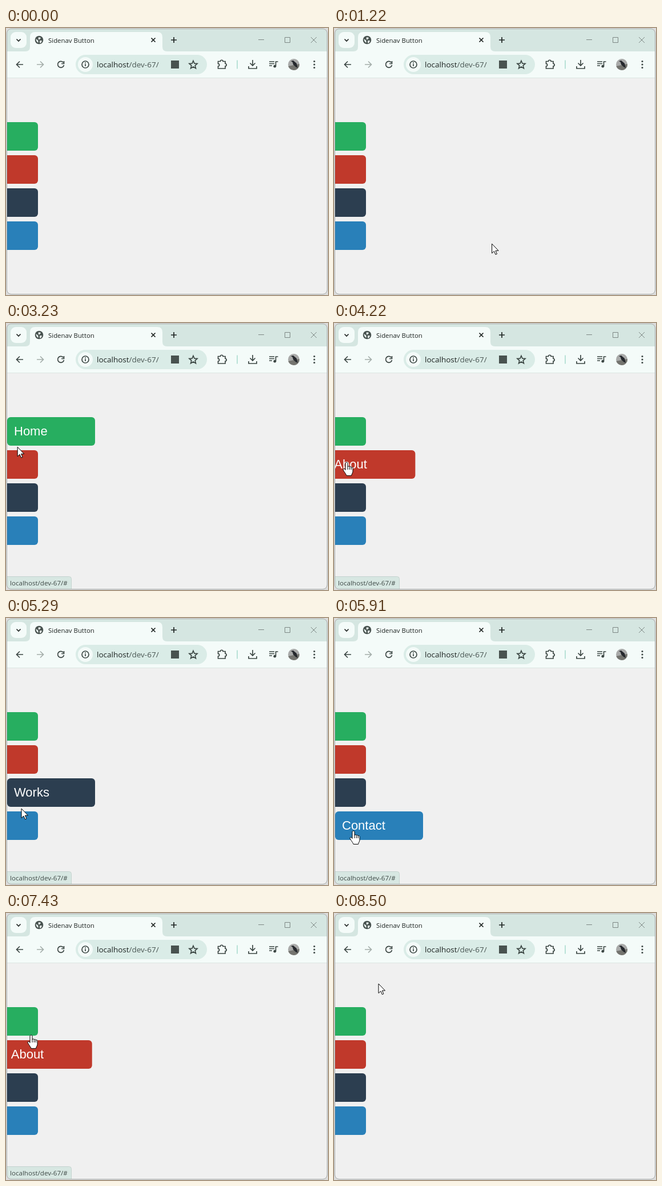
These frames come from a looping animation (564 by 468 pixels, 9.91 s). An HTML page:

```html
<!DOCTYPE html>
<html lang="en">
<head>
<meta charset="utf-8">
<title>Sidenav Button</title>
<style>
  html, body { margin: 0; width: 100%; height: 100%; overflow: hidden; background: #dcdcdc; }
  svg { display: block; }
  text { font-family: "Open Sans", "Noto Sans", sans-serif; fill: #1f2523; }
  .label { font: 22px "Liberation Sans", Arial, sans-serif; fill: #fff; }
  .line { fill: none; stroke: #3c4744; stroke-width: 1.7; }
  .thin { fill: none; stroke: #7d8784; stroke-width: 1; }
  .bold { stroke: #1f2523; }
</style>
</head>
<body>
<svg width="564" height="468" viewBox="0 0 564 468">
  <defs>
    <clipPath id="frame"><rect x="2" y="2" width="560" height="464" rx="7"/></clipPath>
    <clipPath id="face"><circle cx="504" cy="64" r="10"/></clipPath>
  </defs>

  <g clip-path="url(#frame)">
    <rect width="564" height="468" fill="#f0f0f0"/>
    <g id="nav"></g>

    <!-- tab strip -->
    <rect width="564" height="42" fill="#d5e6e1"/>
    <g fill="#f4fbf9">
      <rect x="8" y="7" width="28" height="28" rx="9"/>
      <path d="M34 41q8 0 8-8V16q0-9 9-9H265q9 0 9 9V33q0 8 8 8z"/>
      <rect y="41" width="564" height="46"/>
    </g>
    <path d="M0 87.5H564" stroke="#dce5e2"/>
    <path class="line bold" d="M18.5 19.5l3.5 3.5 3.5-3.5"/>
    <circle cx="58" cy="21" r="7.3" fill="#48524f"/>
    <path d="M52.5 19l4 3v4q-4-2-4-7zM57 16l4 1-1.5 3h-3zM59 22h4l-1.5 4-2.5.5z" fill="#e9f2ef"/>
    <text x="74" y="25.5" font-size="11.4">Sidenav Button</text>
    <path class="line bold" d="M254.5 17.5l7 7m0-7l-7 7M289 21h10m-5-5v10"/>
    <path class="thin" d="M442 20.5h10M488.5 16.5h9v9h-9zM534 16l10 10m0-10l-10 10"/>

    <!-- toolbar -->
    <path class="line" d="M30 64H18.5m5.500-5.500L18.500 64l5.500 5.500"/>
    <path class="line" style="stroke:#a5aeab" d="M54 64h11.500M60 58.500l5.500 5.500-5.500 5.500"/>
    <path class="line" d="M100.500 60.500a5.500 5.500 0 1 0 1 4.500M101.500 58v4.500H97"/>
    <rect x="122" y="47" width="230" height="34" rx="17" fill="#daece7"/>
    <circle cx="139" cy="64" r="13" fill="#f4fbf9"/>
    <circle class="line" cx="139" cy="64" r="6"/>
    <path class="line" d="M139 63v4M139 60.300v1.600"/>
    <text x="159" y="69" font-size="13.500">localhost<tspan fill="#4b5754">/dev-67/</tspan></text>
    <rect x="289" y="57" width="14" height="14" fill="#48524f"/>
    <path class="line" d="M328 57.500l2 4.600 5 .4-3.800 3.300 1.200 4.900-4.400-2.600-4.400 2.600 1.200-4.900-3.800-3.300 5-.4z"/>
    <path class="line" d="M371.500 58.500h4a2 2 0 0 1 4.500 0h4v4a2.200 2.200 0 0 1 0 4.400v4.100h-12.500v-4a2.200 2.200 0 0 0 0-4.400z"/>
    <path d="M405 56.500v15" stroke="#b9e2d7" stroke-width="2"/>
    <path class="line" d="M432 56v10m-4.500-4.500L432 66l4.500-4.500M425 67v4h14v-4"/>
    <path class="line" d="M461 59h9m-9 3.500h9m-9 3.500h5M472.500 67v-8h4"/>
    <circle cx="470.800" cy="67.200" r="2.400" fill="#3c4744"/>
    <g clip-path="url(#face)">
      <rect x="494" y="54" width="20" height="20" fill="#a9aaa9"/>
      <path d="M494 67l20-4v11h-20z" fill="#74746f"/>
      <path d="M499 58l4-1 6 5 2 8-4-2-4-4-1-4z" fill="#25282d"/>
    </g>
    <path d="M540 58.500v0m0 5.500v0m0 5.500v0" stroke="#3c4744" stroke-width="3.200" stroke-linecap="round"/>

    <g id="status">
      <path d="M1.500 467V444.500H110.500q4 0 4 4V467" fill="#d7e7e2" stroke="#c5d3cf"/>
      <text x="7" y="460" font-size="11.600" style="fill:#3f4a47">localhost/dev-67/#</text>
    </g>
    <g id="cursor" stroke="#000" stroke-linejoin="round">
      <path id="arrow" d="M0 0V16.500L3.900 12.900 6.400 18.800 8.900 17.700 6.400 12H11.500z" fill="#fff"/>
      <g id="hand" transform="translate(0 -1)">
        <path d="M-2 2C-2-.5 2-.5 2 2V8C2 6.500 5 6.500 5.300 8.200 6 7 8 7.500 8.200 9 9 8 11 8.500 11 10.500V16C11 19 9 20 8.500 23.500H0C-1 20-6 15-6 12.500-5.500 11-3.500 11-2 13.500z" fill="#fff"/>
        <path d="M2 8v5M5.300 8.500V13M8.200 9v4" fill="none"/>
      </g>
    </g>
  </g>
  <rect x="1.500" y="1.500" width="561" height="465" rx="7.500" fill="none" stroke="#a9adac"/>
</svg>

<script>
const LOOP = 9910, SLIDE = 500, LAG = 50;
const TOP = 165, PITCH = 58, HEIGHT = 50, WIDTH = 154, SHOWN = 54;
const $ = id => document.getElementById(id);

const buttons = [
  { text: "Home", color: "#27ae60" },
  { text: "About", color: "#c0392b" },
  { text: "Works", color: "#2c3e50" },
  { text: "Contact", color: "#2980b9" }
];

// pointer stops: time, x, y
const stops = [
  [1100, 325, 450], [1520, 157, 201], [1770, 157, 201], [2110, 26, 169],
  [2790, 24, 180], [3250, 20, 219], [3840, 20, 220], [4220, 22, 245],
  [5290, 27, 334], [5810, 34, 374], [6140, 34, 374], [6225, 36, 334],
  [6610, 44, 303], [7000, 44, 273], [7430, 44, 215], [7950, 55, 165], [8150, 78, 124]
];

function pointer(t) {
  const i = stops.findIndex(s => s[0] > t);
  if (i < 1) return stops.at(i).slice(1);
  const [t0, x0, y0] = stops[i - 1], [t1, x1, y1] = stops[i];
  const k = (t - t0) / (t1 - t0);
  return [x0 + (x1 - x0) * k, y0 + (y1 - y0) * k];
}

// index of the button under the pointer, or -1
function hit(t) {
  const [x, y] = pointer(t), row = Math.floor((y - TOP) / PITCH);
  const inside = x < 2 + SHOWN && (y - TOP) - row * PITCH < HEIGHT;
  return inside && buttons[row] ? row : -1;
}

// Follow the pointer once to learn when each button is entered and left.
const hovers = [];
for (let t = 0, last = -1; t < LOOP; t++) {
  const row = hit(t);
  if (row !== last) {
    if (last >= 0) hovers.at(-1).leave = t + LAG;
    if (row >= 0) hovers.push({ row, enter: t + LAG });
    last = row;
  }
}

// CSS "ease", cubic-bezier(.25, .1, .25, 1)
function ease(p) {
  if (p <= 0) return 0;
  if (p >= 1) return 1;
  let lo = 0, hi = 1, s;
  for (let i = 0; i < 20; i++) {
    s = (lo + hi) / 2;
    if (.75 * s * (1 - s) + s ** 3 < p) lo = s; else hi = s;
  }
  return .3 * s * (1 - s) ** 2 + 3 * s * s * (1 - s) + s ** 3;
}

const openness = (row, t) => hovers.filter(h => h.row === row).reduce((sum, { enter, leave }) =>
  sum + ease((Math.min(t, leave) - enter) / SLIDE) * (1 - ease((t - leave) / SLIDE)), 0);

const show = (id, on) => $(id).setAttribute("visibility", on ? "visible" : "hidden");
const move = (el, x, y) => el.setAttribute("transform", `translate(${x} ${y})`);

$("nav").innerHTML = buttons.map(b =>
  `<g><rect width="${WIDTH}" height="${HEIGHT}" rx="6" fill="${b.color}"/><text class="label" x="12" y="32">${b.text}</text></g>`).join("");
const groups = [...$("nav").children];

function draw(now) {
  const t = now % LOOP, over = hit(t) >= 0;
  groups.forEach((g, i) => move(g, 2 - (WIDTH - SHOWN) * (1 - openness(i, t)), TOP + PITCH * i));
  move($("cursor"), ...pointer(t));
  show("arrow", t >= stops[0][0] && !over);
  show("hand", over);
  show("status", hovers.some(h => t > h.enter + 200 && t < h.leave + 300));
  requestAnimationFrame(draw);
}
draw(performance.now());
</script>
</body>
</html>
```
